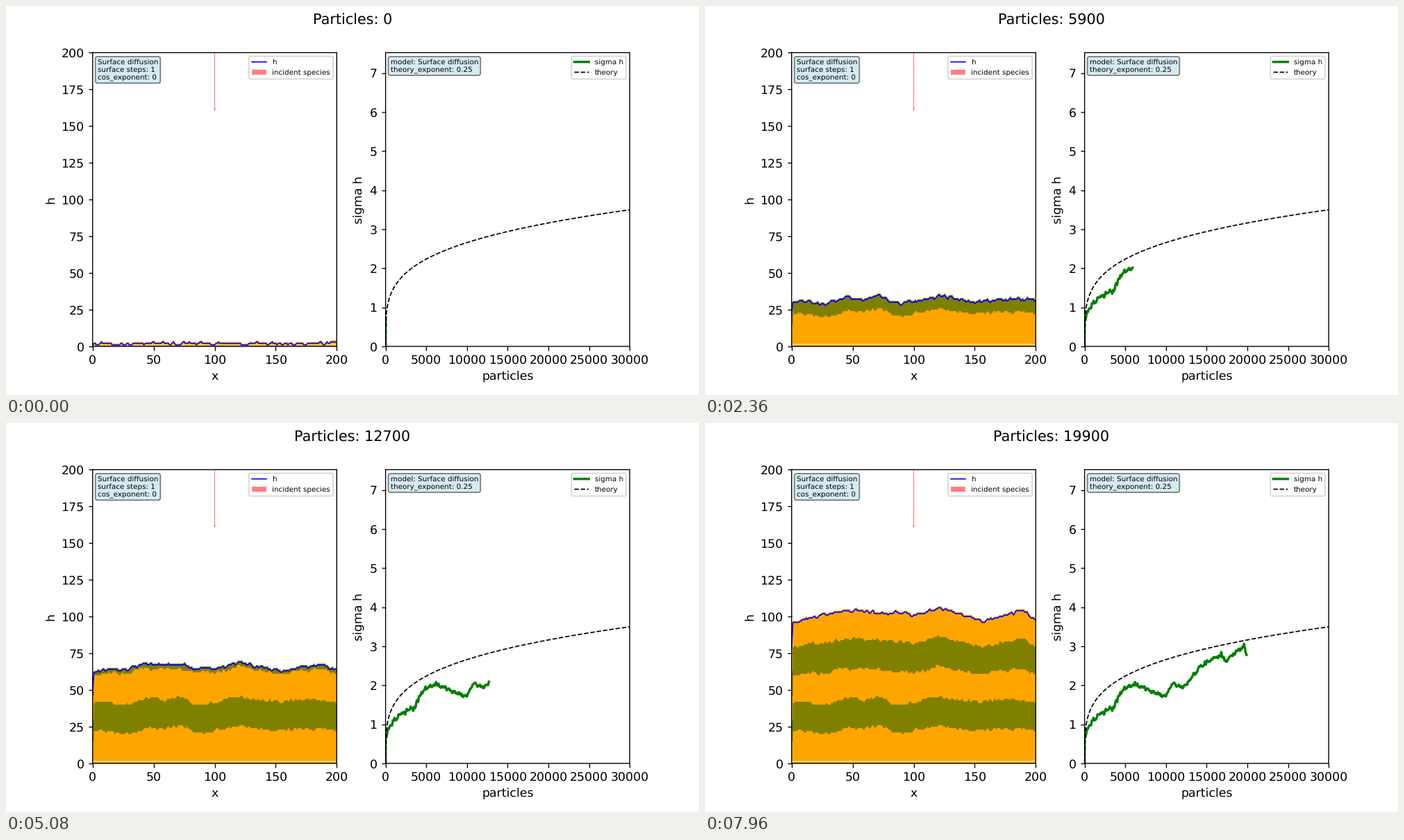
Recreate the animation shown at these times as a matplotlib script. Size 998 by 561 pixels, loop 8 s.

```python
import numpy as np
import matplotlib.pyplot as plt
from matplotlib.animation import FuncAnimation
from matplotlib.patches import Patch, Rectangle

DPI = 124.75
FRAMES, INTERVAL, STEP = 200, 40, 100
SITES, LAYER = 200, 40          # columns, frames per coloured layer
rng = np.random.default_rng(7)
plt.rcParams.update({"font.family": "DejaVu Sans", "path.snap": False,
                     "text.hinting": "none"})

# Surface waviness around its mean height, early and late in the growth
WAVE_X = [1, 15, 28, 45, 58, 70, 84, 102, 120, 138, 155, 175, 190, 199]
EARLY = [-1, -1, -3.3, 2, 0, 3, -2.7, -1, 2.7, 0, -1, .7, .3, -.8]
LATE = [-6, -2, 0, 2.3, 2, .5, 1, -1, 4, 0, -4.5, -1, 2.5, -3.5]

# Turning points of the roughness curve
TURN_K = [0, 3, 12, 36, 47, 61, 100, 108, 122, 142, 168, 175, 196, 199]
TURN_S = [.64, .85, 1.17, 1.48, 1.92, 2.03, 1.72, 2.05, 1.93, 2.5, 2.78,
          2.64, 3.02, 2.78]

frames = np.arange(FRAMES)
cols = np.arange(SITES)


def blend(keys, rows):
    """Interpolate whole rows over all frames."""
    return np.array([np.interp(frames, keys, c) for c in np.transpose(rows)]).T


def grow_surface():
    mean = 2 + frames * STEP / SITES
    early, late = (np.interp(cols, WAVE_X, w) for w in (EARLY, LATE))
    waves = blend([0, 36, 83, 179], [0 * early, early, early, late])
    knots = rng.normal(size=(21, SITES))
    knots = np.array([np.convolve(r, [.3, .5, .3], "same") for r in knots])
    knots *= .65 / knots.std()
    h = mean[:, None] + waves + blend(np.linspace(0, FRAMES, 21), knots)
    h[:, 0] = mean - 1.1 * mean ** .66      # the wall column lags behind
    return np.maximum.accumulate(np.maximum(np.round(h), 1), axis=0)


def roughness():
    sig = np.interp(frames, TURN_K, TURN_S)
    sig[1:-1] += rng.normal(0, .035, FRAMES - 2)
    return np.r_[0, frames * STEP], np.r_[0, sig]


def info_box(ax, text):
    ax.text(.02, .98, text, transform=ax.transAxes, fontsize=6, va="top",
            bbox=dict(boxstyle="round", facecolor="lightblue", alpha=.5))


H = grow_surface()
sx, sy = roughness()

fig, (left, right) = plt.subplots(1, 2, figsize=(8, 561.001 / DPI), dpi=DPI)
fig.subplots_adjust(left=.125, right=.9, top=.88, bottom=.125, wspace=.2)
title = fig.suptitle("Particles: 0")

# Surface panel
edges = np.arange(SITES + 1)
layers = [
    left.stairs(H[0] + 1, edges, fill=True, lw=0, zorder=1 - .1 * i,
                color=("orange", "olive")[i % 2])
    for i in range(FRAMES // LAYER)
]
left.add_patch(Rectangle((0, 1), SITES, .7, fc="#ffdfa0", lw=0, zorder=1.5))
surface, = left.plot(H[0], color="blue", lw=1, label="h")
left.quiver(100, 200, 0, -40, angles="xy", scale_units="xy", scale=1,
            width=.003, color="r", alpha=.5)
left.set(xlim=(0, SITES), ylim=(0, 200), xlabel="x", ylabel="h")
beam = Patch(fc="r", alpha=.5, lw=0, label="incident species")
left.legend(handles=[surface, beam], loc="upper right", fontsize=6)
info_box(left, "Surface diffusion\nsurface steps: 1\ncos_exponent: 0")

# Roughness panel
total = np.arange(0, 30001, STEP)
theory = (total / SITES) ** .25
sigma, = right.plot([], [], color="green", lw=2, label="sigma h")
right.plot(total, theory, "k--", lw=1, label="theory")
right.set(xlim=(0, 30000), ylim=(0, 2.15 * theory[-1]),
          xlabel="particles", ylabel="sigma h")
right.legend(loc="upper right", fontsize=6)
info_box(right, "model: Surface diffusion\ntheory_exponent: 0.25")


def draw(k):
    title.set_text(f"Particles: {k * STEP}")
    for i, layer in enumerate(layers):
        layer.set_visible(i == 0 or k > i * LAYER)
        layer.set_data(H[min(k, (i + 1) * LAYER)] + 1)
    surface.set_ydata(H[k])
    sigma.set_data(sx[:k + 2], sy[:k + 2])
    return [title, surface, sigma, *layers]


anim = FuncAnimation(fig, draw, frames=FRAMES, interval=INTERVAL,
                     init_func=lambda: draw(0), repeat=True, repeat_delay=0)
plt.show()
```
